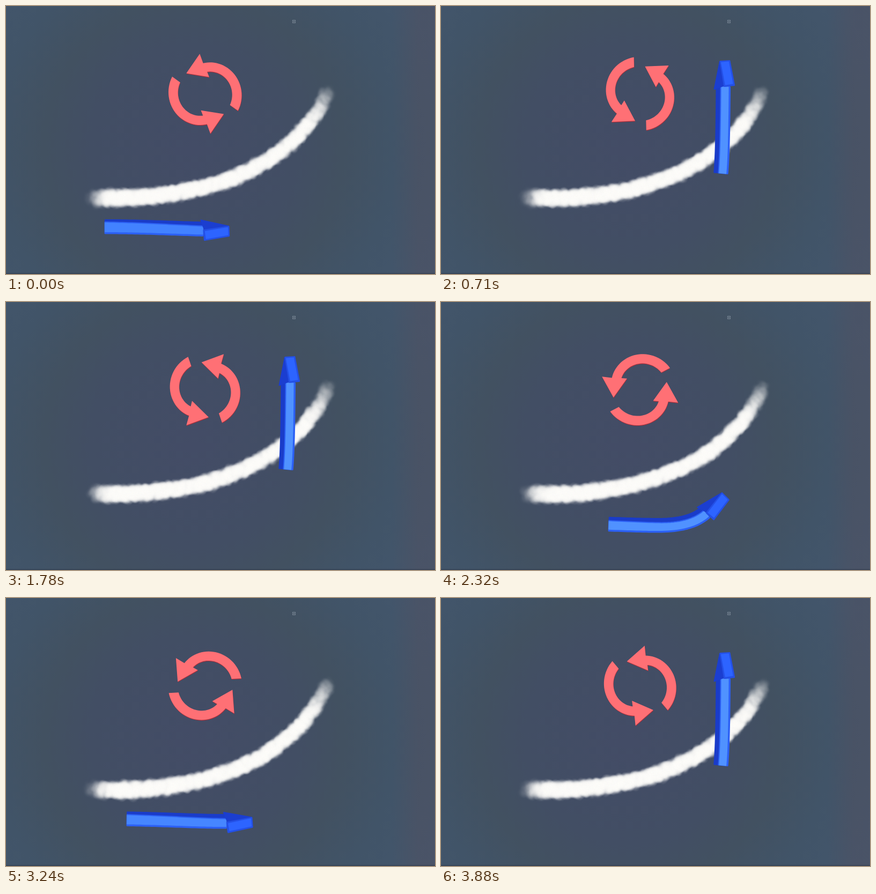
Write an HTML page with a canvas that moves like this. It is 800 px wide and 500 px high and loops after 3960 ms.

```html
<!DOCTYPE html>
<html lang="en">
<head>
<meta charset="utf-8">
<title>Smoke trail and arrows</title>
<style>
html, body { margin: 0; width: 100%; height: 100%; overflow: hidden; background: #42506a; }
canvas { display: block; width: 100vw; height: 100vh; }
</style>
</head>
<body>
<canvas id="stage" width="800" height="500"></canvas>
<script>
const ctx = document.getElementById('stage').getContext('2d');
const LOOP = 3960, STEPS = 51, STEP = LOOP / STEPS;
const TAU = Math.PI * 2;
const clamp = x => Math.max(0, Math.min(1, x));
const smooth = x => (x = clamp(x), x * x * (3 - 2 * x));
const mix = (a, b, x) => a + (b - a) * x;

let seed = 7;
const random = () => (seed = seed * 16807 % 2147483647) / 2147483647;

function makeCanvas(w, h, draw) {
  const c = document.createElement('canvas');
  c.width = w;
  c.height = h;
  draw(c.getContext('2d'));
  return c;
}

function makePath(d) {
  const path = document.createElementNS('http://www.w3.org/2000/svg', 'path');
  path.setAttribute('d', d);
  return path;
}

function polygon(points, fill, edge = 0) {
  ctx.beginPath();
  points.forEach(p => ctx.lineTo(p[0], p[1]));
  ctx.closePath();
  ctx.fillStyle = ctx.strokeStyle = fill;
  ctx.lineJoin = 'round';
  ctx.lineWidth = edge;
  if (edge) ctx.stroke();
  ctx.fill();
}

const backdrop = makeCanvas(800, 500, c => {
  const glow = c.createRadialGradient(350, 265, 0, 350, 265, 480);
  [[0, '#434c66'], [.4, '#424e64'], [.58, '#425161'], [.78, '#415468'], [1, '#43566c']]
    .forEach(([at, color]) => glow.addColorStop(at, color));
  c.fillStyle = glow;
  c.fillRect(0, 0, 800, 500);
  const warm = c.createLinearGradient(720, 0, 800, 0);
  warm.addColorStop(0, 'rgba(92,76,88,0)');
  warm.addColorStop(.6, 'rgba(92,76,88,.26)');
  warm.addColorStop(1, 'rgba(92,76,88,.26)');
  c.fillStyle = warm;
  c.fillRect(720, 0, 80, 500);
  c.fillStyle = 'rgba(35,45,60,.35)';
  c.fillRect(0, 498, 800, 2);
  c.strokeStyle = 'rgba(200,210,220,.4)';
  c.strokeRect(534.5, 26.5, 5, 5);
  c.fillStyle = 'rgba(200,210,220,.4)';
  c.fillRect(536, 28, 2, 2);
});

// Smoke: soft lumpy sprites drifting along a curve, faint at both ends.
const puffSprites = Array.from({ length: 5 }, () => makeCanvas(48, 48, c => {
  for (let i = 0; i < 30; i++) {
    const angle = random() * TAU, reach = 13 * Math.sqrt(random()), r = 6 + random() * 4;
    const x = 24 + reach * Math.cos(angle), y = 24 + reach * Math.sin(angle);
    const soft = c.createRadialGradient(x, y, 0, x, y, r);
    soft.addColorStop(0, 'rgba(253,252,249,.36)');
    soft.addColorStop(1, 'rgba(253,252,249,0)');
    c.fillStyle = soft;
    c.fillRect(0, 0, 48, 48);
  }
}));
const smokePath = makePath('M161 357.5C340 366 530 318 600 160');
const smokeLength = smokePath.getTotalLength();
const puffs = Array.from({ length: 115 }, (_, i) => ({
  at: (i + random() * 1.2) / 115,
  dx: random() * 3 - 1.5,
  dy: random() * 3 - 1.5,
  size: .94 + random() * .12,
  turn: random() * TAU,
  sprite: puffSprites[i % 5]
}));

function drawSmoke(t) {
  for (const puff of puffs) {
    const u = (puff.at + t / 1980) % 1;
    const p = smokePath.getPointAtLength(u * smokeLength);
    const scale = puff.size * mix(1, .86, u);
    ctx.save();
    ctx.globalAlpha = mix(.12, .85, smooth(u / .08)) * mix(1, .15, smooth((u - .82) / .18));
    ctx.translate(p.x + puff.dx, p.y + puff.dy);
    ctx.rotate(puff.turn);
    ctx.scale(scale, scale);
    ctx.drawImage(puff.sprite, -24, -24);
    ctx.restore();
  }
}

// Curved arrow in polar form, angles in degrees behind the tip.
const polar = (r, deg) => [r * Math.cos(deg * Math.PI / 180), -r * Math.sin(deg * Math.PI / 180)];
const curvedArrow = (() => {
  const outer = [], inner = [];
  for (let i = 0; i <= 30; i++) {
    const x = i / 30;
    outer.push(polar(69 - 12 * Math.pow(x, 1.8), mix(-160, -39, x)));
    inner.unshift(polar(51 - 10 * x * x, mix(-157, -48, x)));
  }
  return [...outer, polar(75, -35), polar(51.6, 0), polar(32, -56.5), ...inner];
})();

function drawCycle(t) {
  const angle = -(132.6 + t * 180 / 990) * Math.PI / 180;
  for (const [dx, dy, color] of [[.4, 1.2, '#a8303c'], [0, 0, '#ff7075']]) {
    for (const turn of [0, Math.PI]) {
      ctx.save();
      ctx.translate(371.2 + dx, 163.6 + dy);
      ctx.rotate(angle + turn);
      polygon(curvedArrow, color);
      ctx.restore();
    }
  }
}

// Blue arrow: a two-sided ribbon on a rail, with a rigid head.
const rail = makePath('M183 412C270 412 350 417 400 417C470 418 503 398 515 355C524 322 526 290 527 90');

function railFrame(s) {
  const a = rail.getPointAtLength(s - 2), b = rail.getPointAtLength(s + 2);
  const angle = Math.atan2(b.y - a.y, b.x - a.x), p = rail.getPointAtLength(s);
  const cos = Math.cos(angle), sin = Math.sin(angle);
  return (u, v) => [p.x + u * cos - v * sin, p.y + u * sin + v * cos];
}

function drawArrow(t) {
  const start = 404 * Math.pow(clamp(t % 1020 / 690), 1.3);
  const length = 184 - 24 * smooth((start - 140) / 150);
  const frames = Array.from({ length: 33 }, (_, i) => {
    const s = start + length * i / 32;
    return { at: railFrame(Math.max(2, s)), ridge: mix(-10, -6, clamp(s / 250)) };
  });
  const band = (from, to) => [
    ...frames.map(f => f.at(0, from(f))),
    ...frames.map(f => f.at(0, to(f))).reverse()
  ];
  const k = smooth(start / 130);
  const face = `rgb(${mix(66, 80, k)},${mix(130, 146, k)},255)`;

  polygon(band(() => -12.8, f => f.ridge + 2), '#1a3cc9', 2.5);
  polygon(band(f => f.ridge + 1.5, () => 12), '#2c60f4', 3);
  polygon(band(f => f.ridge + 3, () => 9), face, 2);

  const head = frames[32].at;
  polygon([head(-4, -17), head(48, -7), head(4, 3)], '#1b3ed0', 2);
  polygon([head(2, 2), head(4, 20), head(49, 11), head(48, -6)], '#2450e6', 3);
  polygon([head(5, 4), head(7, 17), head(47, 9), head(46, -4)], '#2d64ff', 2);
}

function draw(now) {
  const step = Math.floor((now % LOOP + 15) / STEP) % STEPS;
  const t = step * STEP;
  ctx.drawImage(backdrop, 0, 0);
  drawSmoke(t);
  drawCycle(t);
  drawArrow(t);
}

const began = performance.now();
function tick() {
  draw(performance.now() - began);
  requestAnimationFrame(tick);
}
tick();
</script>
</body>
</html>
```
